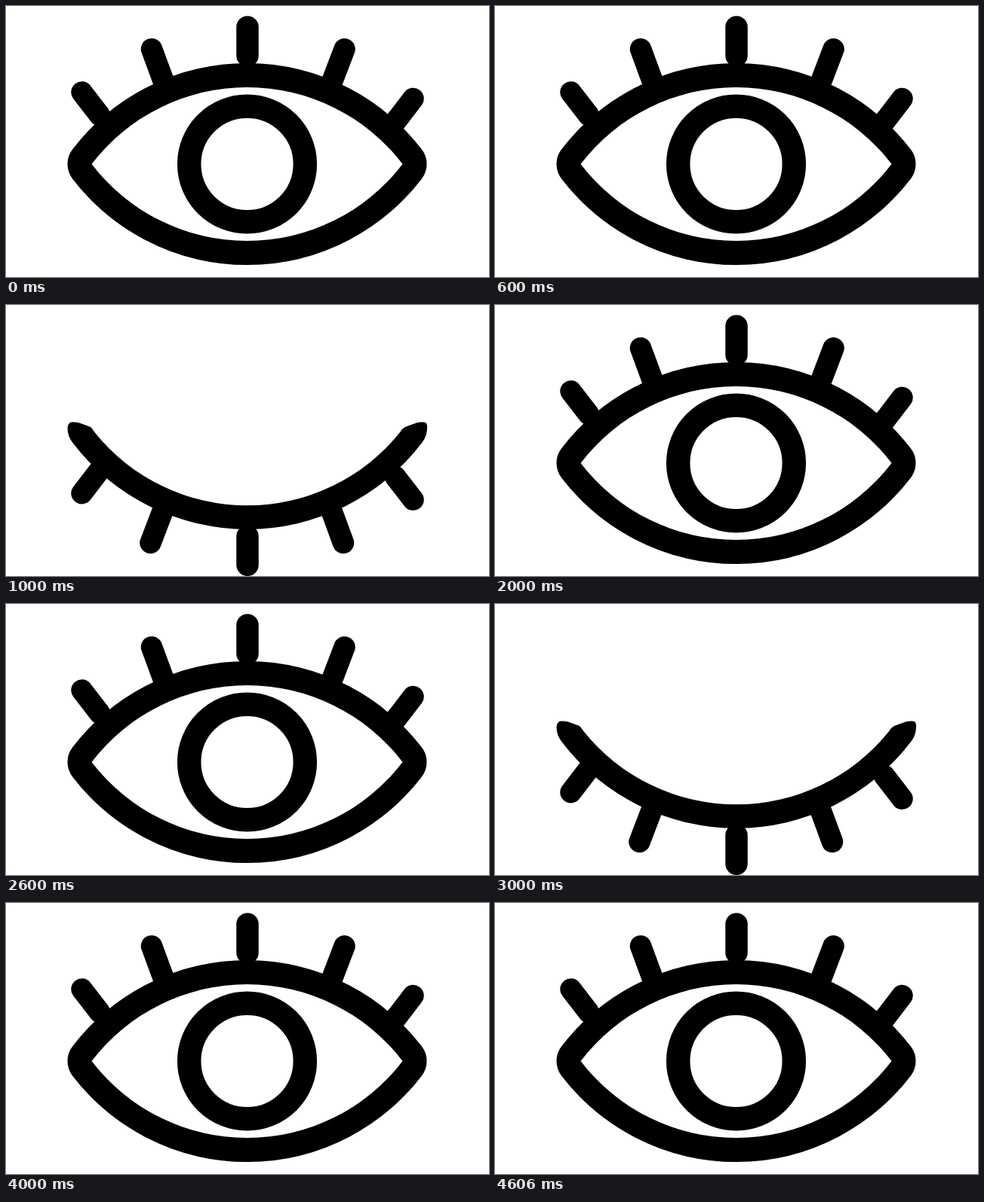
An HTML page that plays this animation: 640 by 360 pixels, repeating every 5010 ms.

```html
<!DOCTYPE html>
<html lang="en">
<head>
<meta charset="utf-8">
<title>Blinking eye</title>
<style>
  html, body { margin: 0; width: 100%; height: 100%; overflow: hidden; background: #fff; }
  svg { display: block; width: 100%; height: 100%; }
  .lashes { stroke: #000; stroke-width: 28.5; stroke-linecap: round; }
  .almond { fill: #fff; stroke: #000; stroke-width: 64; stroke-linejoin: round; paint-order: stroke; }
  .iris { fill: none; stroke: #000; stroke-width: 31.5; }
</style>
</head>
<body>
<svg viewBox="0 0 640 360">
  <g id="lashes" class="lashes">
    <path d="M100.5 114.5L124 145M193 57.2L208 98M448.5 57.2L433 98M539.5 123L515 155"/>
    <path d="M320 28V66" stroke-width="29.5"/>
  </g>
  <g id="open">
    <path class="almond" d="M113.5 210A259 259 0 0 1 525.5 210A259 259 0 0 1 113.5 210Z"/>
    <circle class="iris" cx="319.5" cy="210" r="76.8"/>
  </g>
  <path id="closed" d="M117 168.5A259 259 0 0 0 522.5 168.5Q525 164 529 162L544 156.5Q552 154.5 556 156.2
    Q558.5 158 558 164A32 32 0 0 1 551.5 182.5A290.5 290.5 0 0 1 88 182.5A32 32 0 0 1 81.5 164
    Q82 157 86 155.8Q90 155 97 156.5L112 162Q115 165 117 168.5Z"/>
</svg>
<script>
  const LOOP = 5010, HOLD = 1000, LAST_STEP = 4;
  const byId = id => document.getElementById(id);
  const lashes = byId('lashes'), open = byId('open'), closed = byId('closed');
  const show = (node, on) => node.setAttribute('visibility', on ? 'visible' : 'hidden');

  function draw(time) {
    const step = Math.min(Math.floor((time % LOOP) / HOLD), LAST_STEP);
    const shut = step % 2 === 1;
    show(open, !shut);
    show(closed, shut);
    // The lashes of the shut eye are the open ones turned half way round.
    lashes.setAttribute('transform', `rotate(${shut ? 180 : 0} 320 186.6)`);
  }

  const start = performance.now();
  function tick() {
    draw(performance.now() - start);
    requestAnimationFrame(tick);
  }
  tick();
</script>
</body>
</html>
```
